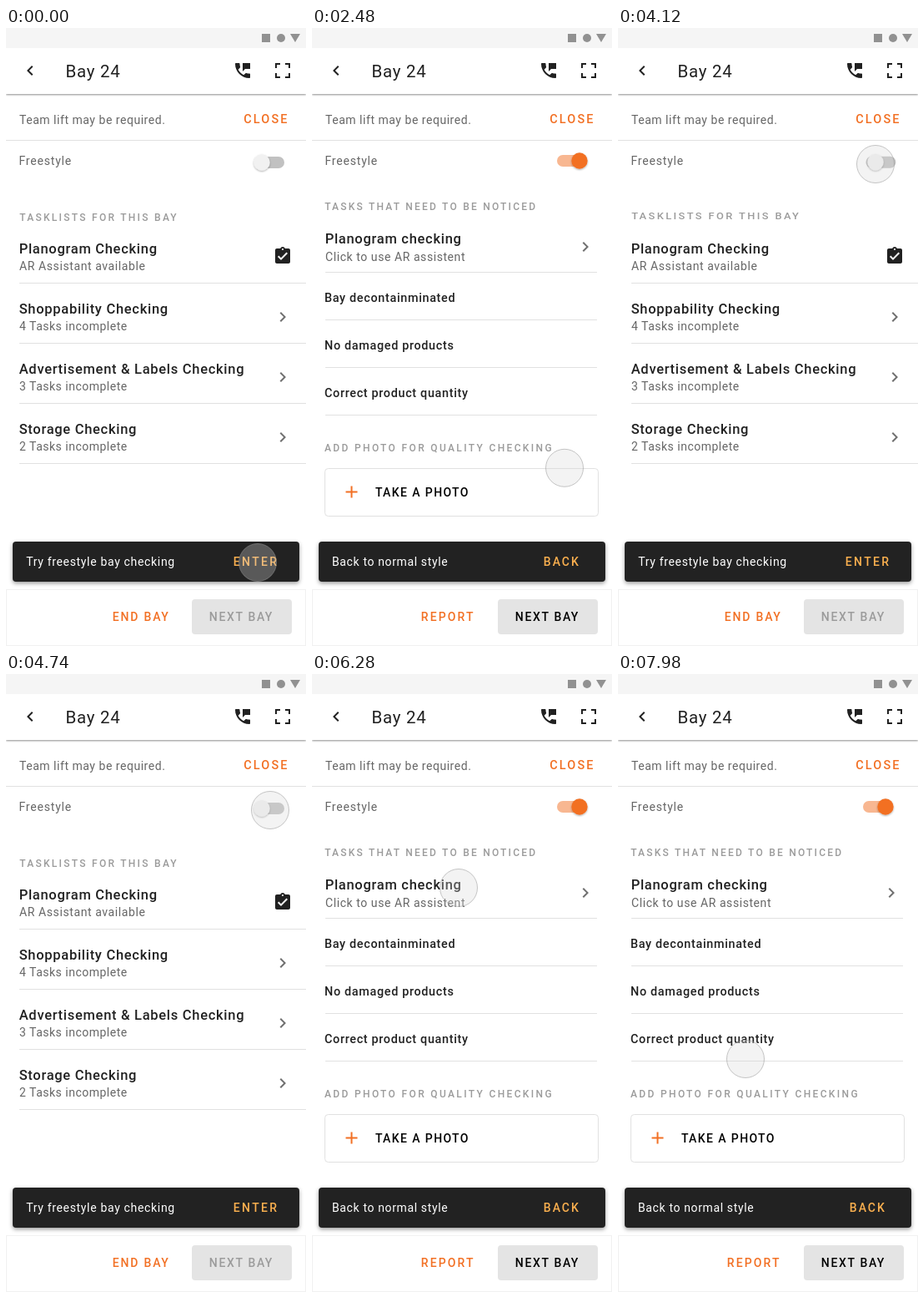
An HTML page that plays this animation: 360x740 px, repeating every 8 s.

```html
<!DOCTYPE html>
<html lang="en">
<head>
<meta charset="utf-8">
<title>Bay checking</title>
<style>
html, body { margin: 0; width: 100%; height: 100%; overflow: hidden; background: #fff; }
svg { display: block; width: 360px; height: 740px; }
text { font-family: Roboto, Inter, sans-serif; white-space: pre; }
.m { font-weight: 500; }
</style>
</head>
<body>
<svg id="stage" viewBox="0 0 360 740"></svg>
<script>
const INK = '#212121', SUB = '#666', PALE = '#9b9b9b', ORANGE = '#f27024', AMBER = '#fbb04f';

const text = (x, y, s, size, gap, fill, cls = '') =>
  `<text x="${x}" y="${y}" font-size="${size}" letter-spacing="${gap}" fill="${fill}" class="${cls}">${s}</text>`;
const title = (y, s) => text(15.7, y, s, 16.5, .7, INK, 'm');
const note = (y, s, gap = .57) => text(16, y, s, 14, gap, SUB);
const item = (y, s) => text(15, y, s, 14.4, .67, INK, 'm');
const button = (x, y, s, gap, fill, size = 14) => text(x, y, s, size, gap, fill, 'm');
const caption = (x, y, s, gap) => text(x, y, s, 12, gap, PALE, 'm');
const rect = (x, y, w, h, fill, more = '') =>
  `<rect x="${x}" y="${y}" width="${w}" height="${h}" fill="${fill}" ${more}/>`;
const rule = (x, y, w) => rect(x, y, w, 1, '#e1e1e1');
const icon = (x, y, d, fill = INK) => `<path transform="translate(${x} ${y})" fill="${fill}" d="${d}"/>`;
const next = (x, y) => icon(x, y, 'M10 6L8.59 7.41 13.17 12l-4.58 4.59L10 18l6-6z', '#707070');

const row = (y, name, info) => title(y, name) + note(y + 20, info, .5) + next(320, y - 8) + rule(16, y + 35, 344);

const frame = `
  ${rect(0, 0, 360, 740, '#fff')}
  ${rect(0, 24, 360, 55, '#fff', 'filter="url(#low)"')}
  ${rect(0, 0, 360, 24, '#f5f5f5')}
  ${rect(307, 7, 10, 10, '#919191')}
  <circle cx="330" cy="12" r="5" fill="#919191"/>
  <path d="M341 7h12l-6 10z" fill="#919191"/>
  ${icon(17, 39, 'M15.41 7.41L14 6l-6 6 6 6 1.41-1.41L10.83 12z')}
  ${text(71.5, 59, 'Bay 24', 20.5, .75, INK)}
  ${icon(272, 39, 'M20 15.5c-1.25 0-2.45-.2-3.57-.57-.35-.11-.74-.03-1.02.24l-2.2 2.2c-2.83-1.44-5.15-3.75-6.59-6.58l2.2-2.21c.28-.27.36-.66.25-1.01C8.7 6.45 8.5 5.25 8.5 4c0-.55-.45-1-1-1H4c-.55 0-1 .45-1 1 0 9.39 7.61 17 17 17 .55 0 1-.45 1-1v-3.5c0-.55-.45-1-1-1zM12 3v10l3-3h6V3h-9z')}
  <path d="M324 48v-5h5M335 43h5v5M340 54v5h-5M329 59h-5v-5" fill="none" stroke="${INK}" stroke-width="2"/>
  ${note(115, 'Team lift may be required.', .53)}
  ${button(285.3, 114, 'CLOSE', 2.1, ORANGE, 14.5)}
  ${rule(0, 134, 360)}
  ${text(15.5, 164, 'Freestyle', 14, .8, SUB)}
  ${rect(.5, 672.5, 359, 67, '#fff', 'stroke="#f1f1f1"')}
  ${rect(223, 684, 120, 42, '#e4e4e4', 'rx="4"')}
  ${rect(8, 615, 344, 48, INK, 'rx="4" filter="url(#high)"')}`;

const normal = `
  ${title(270, 'Planogram Checking')}
  ${note(290, 'AR Assistant available', .6)}
  ${icon(320, 261, 'M19 3h-4.18C14.4 1.84 13.3 1 12 1c-1.3 0-2.4.84-2.82 2H5c-1.1 0-2 .9-2 2v14c0 1.1.9 2 2 2h14c1.1 0 2-.9 2-2V5c0-1.1-.9-2-2-2zm-7 0c.55 0 1 .45 1 1s-.45 1-1 1-1-.45-1-1 .45-1 1-1zm-2 14l-4-4 1.41-1.41L10 14.17l6.59-6.59L18 9l-8 8z')}
  ${rule(16, 305, 344)}
  ${row(342, 'Shoppability Checking', '4 Tasks incomplete')}
  ${row(414, 'Advertisement &amp; Labels Checking', '3 Tasks incomplete')}
  ${row(486, 'Storage Checking', '2 Tasks incomplete')}
  ${text(24.2, 644, 'Try freestyle bay checking', 14, .67, '#fff')}
  ${button(272.8, 644, 'ENTER', 2.35, AMBER)}
  ${button(127.8, 710, 'END BAY', 1.8, ORANGE)}
  ${button(243.8, 710, 'NEXT BAY', 1.66, PALE)}`;

const free = `
  ${title(258, 'Planogram checking')}
  ${note(279, 'Click to use AR assistent')}
  ${next(316, 250)}
  ${item(328, 'Bay decontainminated')}
  ${item(385, 'No damaged products')}
  ${item(442, 'Correct product quantity')}
  ${[292, 349, 406, 463].map(y => rule(16, y, 326)).join('')}
  ${caption(15, 507, 'ADD PHOTO FOR QUALITY CHECKING', 2.35)}
  ${rect(15.5, 527.5, 328, 57, '#fff', 'rx="4" stroke="#e1e1e1"')}
  <path d="M40.5 555.5h14M47.5 548.5v14" stroke="${ORANGE}" stroke-width="2"/>
  ${button(76, 561, 'TAKE A PHOTO', 1.4, '#000')}
  ${text(24, 644, 'Back to normal style', 14, .63, '#fff')}
  ${button(277.8, 644, 'BACK', 2, AMBER)}
  ${button(130.8, 710, 'REPORT', 2.1, ORANGE)}
  ${button(243.8, 710, 'NEXT BAY', 1.66, '#000')}`;

const $ = id => document.getElementById(id);
$('stage').innerHTML = `
  <defs>
    <filter id="low" x="-5%" y="-20%" width="110%" height="150%"><feDropShadow dx="0" dy="1" stdDeviation=".8" flood-opacity=".45"/></filter>
    <filter id="high" x="-5%" y="-30%" width="110%" height="170%"><feDropShadow dx="0" dy="2" stdDeviation="2.5" flood-opacity=".4"/></filter>
    <filter id="dot" x="-30%" y="-30%" width="160%" height="160%"><feDropShadow dx="0" dy="1" stdDeviation=".8" flood-opacity=".35"/></filter>
  </defs>
  ${frame}
  <g id="normal">${normal}</g>
  <g id="free">${free}</g>
  <g id="headNormal">${caption(0, 0, 'TASKLISTS FOR THIS BAY', 2.28)}</g>
  <g id="headFree">${caption(0, 0, 'TASKS THAT NEED TO BE NOTICED', 2.24)}</g>
  <rect id="track" width="36" height="14" rx="7"/>
  <circle id="knob" r="9.7" filter="url(#dot)"/>
  <circle id="touch" r="22.5" fill="#d8d8d8" fill-opacity=".3" stroke="#979797" stroke-opacity=".55"/>`;

const mix = (a, b, p) => a + (b - a) * p;

// cubic-bezier(.25, .1, .25, 1)
function ease(x) {
  if (x <= 0) return 0;
  if (x >= 1) return 1;
  let lo = 0, hi = 1, u;
  for (let i = 0; i < 24; i++) {
    u = (lo + hi) / 2;
    if (.75 * u * (1 - u) + u ** 3 < x) lo = u; else hi = u;
  }
  return .3 * u * (1 - u) ** 2 + 3 * u * u * (1 - u) + u ** 3;
}

// start, duration, x, y, power of the sideways progress
const moves = [
  [2340, 790, 319, 181, 2],
  [3160, 390, 309, 163, 1],
  [4540, 210, 317, 163, 1],
  [5600, 680, 176, 256, 1],
  [6800, 820, 132, 418, 2],
  [7620, 360, 153, 461, 1]
];

function touchAt(t) {
  let x = 302, y = 640;
  for (const [start, span, tx, ty, bend] of moves) {
    const p = ease((t - start) / span);
    x = mix(x, tx, p ** bend);
    y = mix(y, ty, p);
  }
  return [x, y];
}

const set = (id, attrs) => { for (const k in attrs) $(id).setAttribute(k, attrs[k]); };
const show = (id, on) => set(id, { display: on ? 'inline' : 'none' });

function draw(t) {
  const on = t >= 1480 && t < 3920 || t >= 5020;
  const since = [5020, 3920, 1480].find(s => t >= s);
  const p = since ? ease((t - since) / 360) : 1;
  const k = on ? p : 1 - p;   // 0 normal, 1 freestyle

  for (const [name, head, vis] of [['normal', 'headNormal', !on], ['free', 'headFree', on]]) {
    show(name, vis);
    show(head, vis);
  }
  const sx = mix(on ? .686 : 1.457, 1, p), sy = mix(on ? 1.1 : .9, 1, p);
  set(on ? 'headFree' : 'headNormal',
    { transform: `translate(${mix(16.3, 15.2, k)} ${mix(231, 218, k)}) scale(${sx} ${sy})` });

  const y = mix(161, 159, k);
  set('track', { x: mix(298, 294, k), y: y - 7, fill: on ? ORANGE : '#c1c1c1', 'fill-opacity': on ? mix(1, .5, p) : 1 });
  set('knob', { cx: mix(307, 321, k), cy: y, fill: on ? ORANGE : '#f1f1f1' });

  const [cx, cy] = touchAt(t);
  set('touch', { cx, cy });
}

const begin = performance.now();
function tick() {
  draw((performance.now() - begin) % 8000);
  requestAnimationFrame(tick);
}
tick();
</script>
</body>
</html>
```
